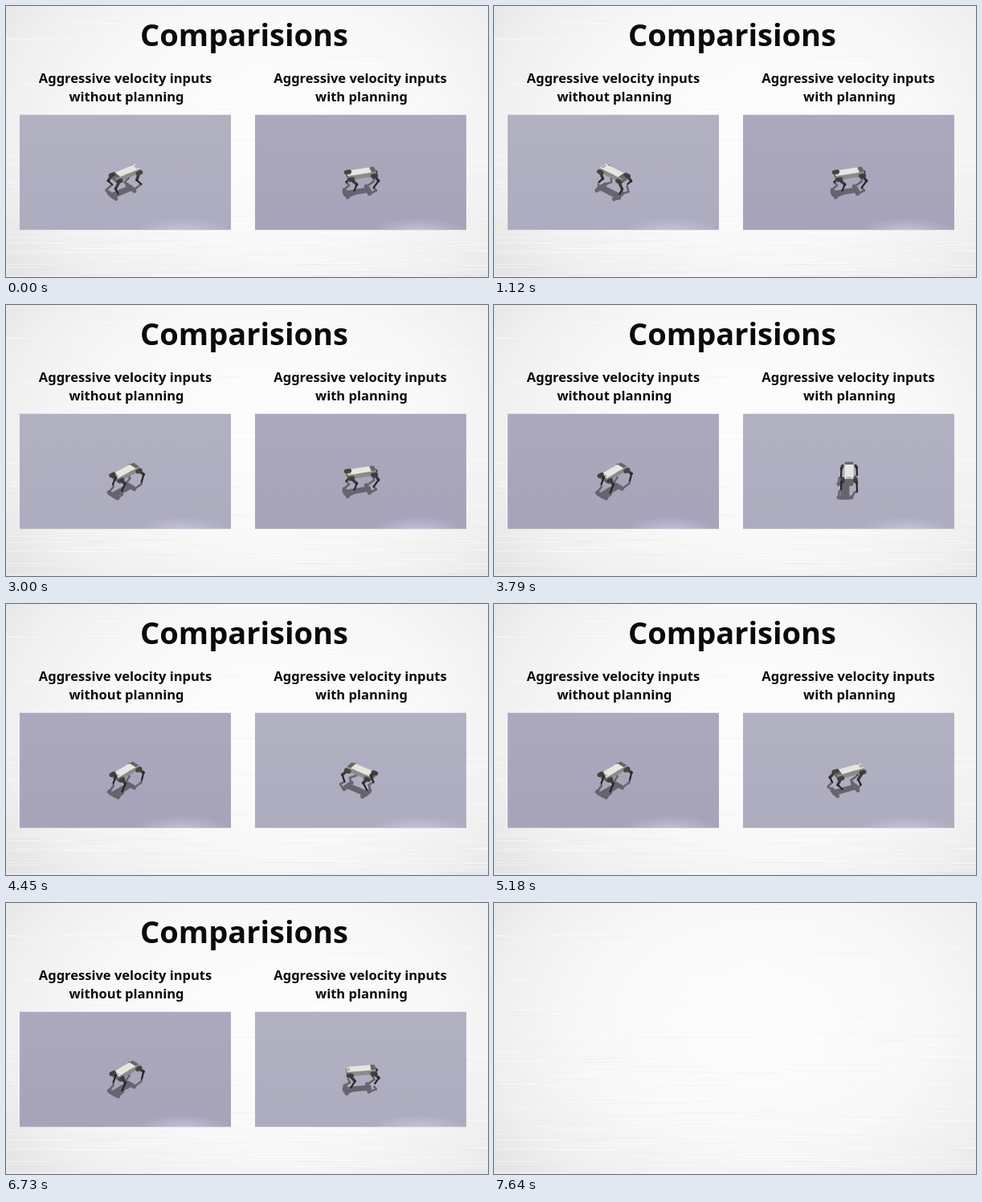
Write an HTML page with a canvas that moves like this. It is 600 by 338 pixels and loops after 7670 ms.

```html
<!DOCTYPE html>
<html lang="en">
<head>
<meta charset="utf-8">
<title>Comparisions</title>
<style>
html, body { margin: 0; width: 100%; height: 100%; overflow: hidden; background: #f4f4f5; }
canvas { display: block; width: 600px; height: 338px; }
</style>
</head>
<body>
<canvas id="stage" width="600" height="338"></canvas>
<script>
const W = 600, H = 338, LOOP = 7670;
const SWAP = 3080;   // left clip stops, right clip starts
const END = 6800;    // titles and clips leave
const SIN = 0.6, COS = 0.8;   // camera pitch
const g = document.getElementById('stage').getContext('2d');

const layer = paint => {
  const c = document.createElement('canvas');
  c.width = W; c.height = H;
  paint(c.getContext('2d'));
  return c;
};

function seeded(seed) {
  return () => (seed = (seed * 16807) % 2147483647) / 2147483647;
}

function paintBackdrop(c) {
  c.save();
  c.translate(325, 150);
  c.scale(1, 0.72);
  const glow = c.createRadialGradient(0, 0, 60, 0, 0, 400);
  glow.addColorStop(0, '#fdfcfd');
  glow.addColorStop(0.45, '#f9f8f9');
  glow.addColorStop(0.8, '#efeff0');
  glow.addColorStop(1, '#e5e5e6');
  c.fillStyle = glow;
  c.fillRect(-400, -300, 800, 700);
  c.restore();
  const rnd = seeded(71);
  for (let i = 0; i < 260; i++) {
    const y = Math.floor(H * Math.sqrt(rnd())), len = 20 + rnd() * 110;
    c.fillStyle = rnd() < 0.55 ? 'rgba(255,255,255,.4)' : 'rgba(215,215,218,.17)';
    c.fillRect(rnd() * (W + 60) - 60, y, len, 1);
  }
}

function paintText(c) {
  const font = (weight, size) => c.font = `${weight} ${size}px "Noto Sans", "Open Sans", sans-serif`;
  // Font size at which a line has the given width
  const sizeFor = (text, weight, width) => {
    font(weight, 100);
    return 100 * width / c.measureText(text).width;
  };
  c.fillStyle = '#0b0b0b';
  c.textAlign = 'center';
  font(700, sizeFor('Comparisions', 700, 259));
  c.fillText('Comparisions', 296.5, 50);
  font(600, sizeFor('Aggressive velocity inputs', 600, 215.5));
  [[148.5, 'without planning', 150], [441, 'with planning', 442.5]].forEach(([x, second, x2]) => {
    c.fillText('Aggressive velocity inputs', x, 96);
    c.fillText(second, x2, 119);
  });
}

const backdrop = layer(paintBackdrop), titles = layer(paintText);

function panel(x, active) {
  const y = 135.5, w = 263, h = 144;
  g.save();
  g.beginPath();
  g.rect(x, y, w, h);
  g.clip();
  const fill = g.createLinearGradient(0, y, 0, y + h);
  fill.addColorStop(0, active ? '#b1b1c2' : '#aca9be');
  fill.addColorStop(1, active ? '#adacbf' : '#a6a3ba');
  g.fillStyle = fill;
  g.fillRect(x, y, w, h);
  g.translate(x + 203, y + h + 3);
  g.scale(1, 0.3);
  const shine = g.createRadialGradient(0, 0, 0, 0, 0, 62);
  shine.addColorStop(0, 'rgba(214,210,238,.75)');
  shine.addColorStop(1, 'rgba(200,198,226,0)');
  g.fillStyle = shine;
  g.fillRect(-70, -70, 140, 140);
  g.restore();
}

// Smooth value through [time, value] points
function track(points, t) {
  if (t <= points[0][0]) return points[0][1];
  for (let i = 1; i < points.length; i++) {
    const [t0, v0] = points[i - 1], [t1, v1] = points[i];
    if (t <= t1) return v0 + (v1 - v0) * (t - t0) / (t1 - t0);
  }
  return points[points.length - 1][1];
}

const leftYaw = [[0, 215], [1120, 320], [2240, 375], [SWAP, 405]];
const rightYaw = [[SWAP, 15], [3790, 90], [5180, 205], [6240, 320], [END, 375]];

// Four-legged robot; its rear points along local +x
function robot(cx, cy, yaw, step) {
  const a = yaw * Math.PI / 180, ca = Math.cos(a), sa = Math.sin(a);
  const world = ([x, y, z]) => [x * ca - y * sa, x * sa + y * ca, z];
  const view = p => {
    const [x, y, z] = world(p);
    return [cx + x, cy - y * SIN - z * COS];
  };
  const shade = p => {
    const [x, y, z] = world(p);
    return [cx + x - z * 0.3, cy - (y - z * 0.85) * SIN];
  };
  const trace = (pts, map) => {
    g.beginPath();
    pts.forEach(p => g.lineTo(...map(p)));
  };
  const poly = (pts, color, map = view) => {
    trace(pts, map);
    g.closePath();
    g.fillStyle = color;
    g.fill();
  };
  const line = (pts, color, width, map = view) => {
    trace(pts, map);
    g.strokeStyle = color;
    g.lineWidth = width;
    g.stroke();
  };

  const L = 18, B = 5.5, top = 21, low = 14;
  const rect = z => [[-L, -B, z], [L, -B, z], [L, B, z], [-L, B, z]];
  const legs = [];
  for (const sx of [-1, 1]) for (const sy of [-1, 1]) {
    const swing = Math.sin(step + (sx * sy > 0 ? 0 : Math.PI));
    const lift = Math.max(0, swing) * 3, reach = Math.cos(step + (sx * sy > 0 ? 0 : Math.PI)) * 2.5;
    const hip = [sx * 15, sy * 8, 17];
    legs.push({
      hip,
      knee: [sx * 15 + 6 + reach * 0.4, sy * 9.5, 9 + lift * 0.6],
      foot: [sx * 15 + 1 + reach, sy * 10, lift],
      depth: world(hip)[1]
    });
  }
  legs.sort((p, q) => q.depth - p.depth);

  g.lineCap = g.lineJoin = 'round';
  const dark = '#66656f';
  poly(rect(17), dark, shade);
  legs.forEach(l => line([l.hip, l.knee, l.foot], dark, 2.6, shade));
  [-14, 14].forEach(x => line([[x, -8, 17], [x, 8, 17]], dark, 5, shade));

  const drawLeg = l => {
    line([l.hip, l.knee], '#3b3c3b', 3.6);
    line([l.knee, l.foot], '#242525', 2.2);
  };
  legs.slice(0, 2).forEach(drawLeg);

  const up = rect(top), down = rect(low);
  const normals = [[0, -1], [1, 0], [0, 1], [-1, 0]];
  normals.forEach(([nx, ny], i) => {
    if (nx * sa + ny * ca >= 0) return;
    const j = (i + 1) % 4;
    poly([up[i], up[j], down[j], down[i]], i % 2 ? '#666765' : '#8b8c88');
  });
  poly(up, '#e5e6e1');
  poly([[L - 6, -B, top], [L, -B, top], [L, B, top], [L - 6, B, top]], '#666866');
  poly([[-L, -3.5, top], [-L + 4, -3.5, top], [-L + 4, 3.5, top], [-L, 3.5, top]], '#b2b3af');
  legs.forEach(l => {
    const [x, y] = l.hip;
    if (l.depth < 5) line([[x - 2, y, 17], [x + 2, y, 17]], '#434541', 5.5);
  });
  legs.slice(2).forEach(drawLeg);
}

function draw(now) {
  const t = now % LOOP;
  g.drawImage(backdrop, 0, 0);
  if (t < END) {
    const first = t < SWAP;
    panel(17, first);
    panel(310, !first);
    g.drawImage(titles, 0, 0);
    robot(149, 223, track(leftYaw, t), Math.min(t, SWAP) / 75);
    robot(442, 223, track(rightYaw, t), Math.max(t - SWAP, 0) / 75);
  }
  requestAnimationFrame(() => draw(performance.now() - start));
}

const start = performance.now();
draw(0);
</script>
</body>
</html>
```
